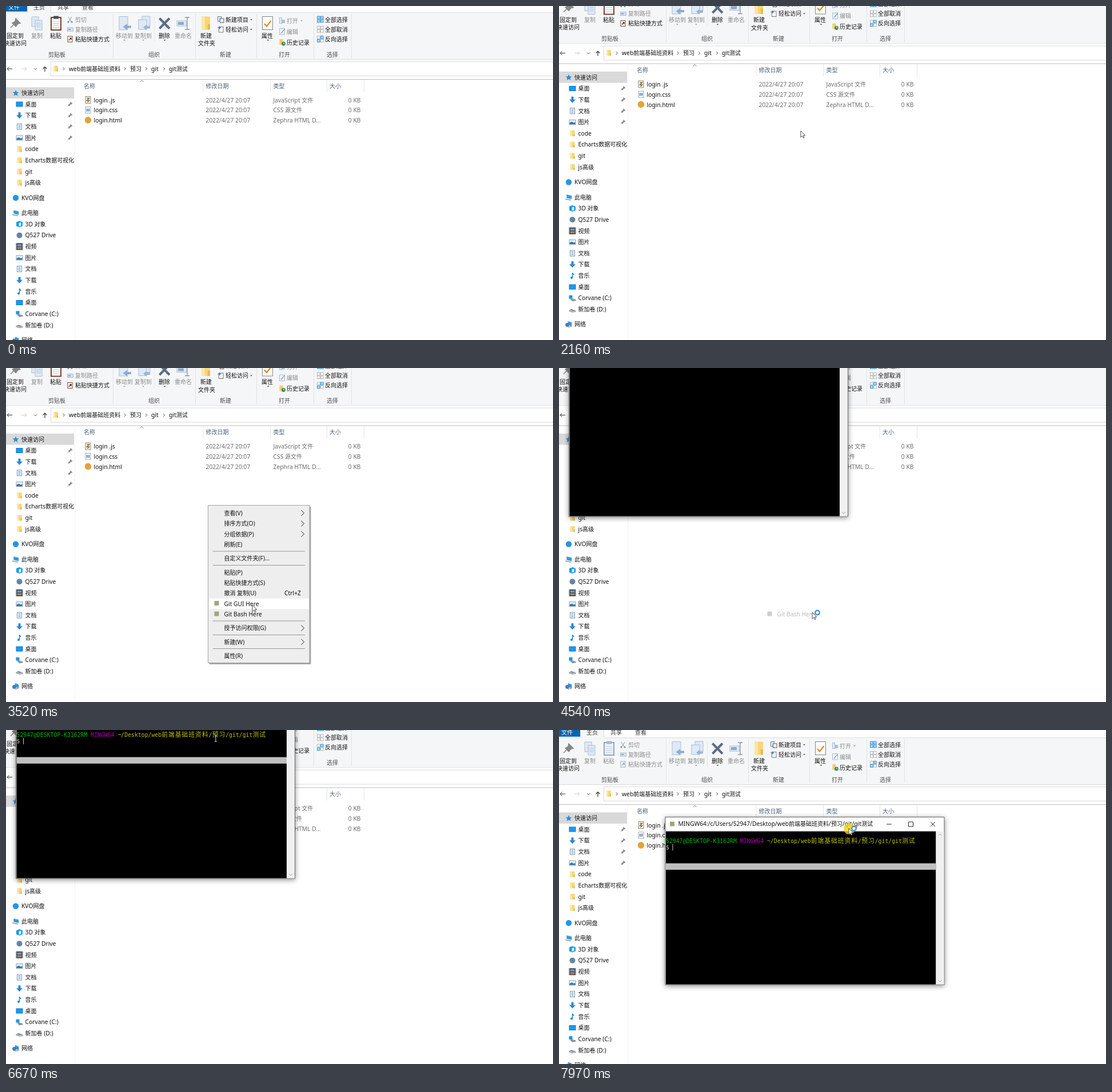
These frames come from a looping animation (957x585 px, 8000 ms). An HTML page:

```html
<!DOCTYPE html>
<html lang="zh-CN">
<head>
<meta charset="utf-8">
<title>Git Bash</title>
<style>
html, body { margin: 0; width: 100%; height: 100%; overflow: hidden; background: #fff; }
svg { display: block; width: 100%; height: 100%; }
text { font: 10px "Noto Sans", "Noto Sans CJK SC", "Noto Sans CJK JP", sans-serif; white-space: pre; }
.latin { font-size: 10.3px; }
.term text { font: 9.8px "DejaVu Sans Mono", "Noto Sans CJK SC", "Noto Sans CJK JP", monospace; }
.term .wide { font-size: 10.8px; letter-spacing: 1px; }
</style>
</head>
<body>
<svg id="stage" viewBox="0 0 957 585"></svg>
<script>
const LOOP = 8000;
const INK = '#111', DIM = '#8c8c8c', MUTED = '#6d6d6d', HEAD = '#4c607a';

const rect = (x, y, w, h, fill, stroke) =>
  `<rect x="${x}" y="${y}" width="${w}" height="${h}" fill="${fill}"${stroke ? ` stroke="${stroke}"` : ''}/>`;
const path = (d, stroke, w = 1, fill = 'none') =>
  `<path d="${d}" stroke="${stroke}" stroke-width="${w}" fill="${fill}"/>`;
const dot = (x, y, r, fill) => `<circle cx="${x}" cy="${y}" r="${r}" fill="${fill}"/>`;
const at = (x, y, body) => `<g transform="translate(${x} ${y})">${body}</g>`;
const group = (id, body, attrs = '') => `<g id="${id}" ${attrs}>${body}</g>`;
const text = (x, cy, s, fill = INK, anchor = 'start') =>
  `<text x="${x}" y="${cy + 3.7}" fill="${fill}" text-anchor="${anchor}">` +
  s.replace(/[ -~]+/g, m => `<tspan class="latin">${m}</tspan>`) + '</text>';
const drop = (x, y, fill = '#444') => path(`M${x - 2} ${y - 1}h4l-2 2z`, 'none', 0, fill);
const chevron = (x, y, s = 2.5, c = '#444') => path(`M${x - s / 2} ${y - s}l${s} ${s}l${-s} ${s}`, c);
const page = (x, y, w, h, fill = '#fff', stroke = '#9aa7b5') => rect(x, y, w, h, fill, stroke);

const icons = {
  star: path('M0-5.5L1.6-1.8L5.5-1.5L2.5 1.1L3.5 5L0 2.9L-3.5 5L-2.5 1.1L-5.5-1.5L-1.6-1.8Z', 'none', 0, '#2b8fd9'),
  desktop: rect(-6, -4.5, 12, 9, '#0a7bd6') + rect(-5, -3.5, 10, 7, '#1a98f0'),
  down: path('M-2-5.5h4v5h3.5L0 5.5L-5.5-.5H-2Z', 'none', 0, '#2f86d2'),
  doc: page(-4, -5, 8, 10, '#f2f7fb', '#7f97aa') + path('M-2-2.5h4M-2 0h4M-2 2.5h4', '#4b9bd0'),
  picture: rect(-5.5, -4, 11, 8, '#eaf4fb', '#8aa3b5') + path('M-5 3.5V1L-1-1L2 1L5 0V3.5Z', 'none', 0, '#3478a8'),
  folder: rect(-4, -5, 8, 10, '#f6d676') + rect(-4, -5, 3, 10, '#fbe7a5') + rect(2, 1, 2, 4, '#e2b74d'),
  disc: dot(0, 0, 5.2, '#2595e4'),
  steel: dot(0, 0, 5, '#6585a3'),
  pc: path('M-3.5-4.5L5-2.5V3L-3.5 1Z', '#7aa8c8', .8, '#2a9ae4') + path('M-6 3L4 5', '#8b9aa5', 1.5),
  cube: path('M-5.5-3.5L0-5.5L5.5-3.5V3.5L0 5.5L-5.5 3.5Z', 'none', 0, '#1a9ae5') +
    path('M-1-2L3-3V3L-1 4Z', 'none', 0, '#d9f1fc'),
  film: rect(-6, -6, 12, 12, '#3c4650') + rect(-3.5, -4, 7, 3.5, '#6ea0ce') + rect(-3.5, .8, 7, 3.5, '#b98258') +
    path('M-5-5V6M5-5V6', '#cfd6dc', 1).replace('/>', ' stroke-dasharray="1.3 1.3"/>'),
  note: path('M0 3.5V-5Q1-2.5 3-1.5', '#1087d8', 1.5) + dot(-1.5, 3.6, 2, '#1087d8'),
  drive: path('M-6 1.5L-2-.5L6 2V4.5L0 5.5L-6 3.5Z', 'none', 0, '#8b9298') + path('M-5 2L1 4L6 2.5', '#d9dde0'),
  sysdrive: path('M-4 2L-1 .5L6 2.5V4.5L0 5.5Z', 'none', 0, '#8b9298') + rect(-6, -5, 6, 6, '#1d96e2'),
  net: path('M-1-5L5-3V3L-1 1Z', '#5b93bf', .8, '#2a9ae4') + dot(-2.5, 1, 3.4, '#3f7fc0') + path('M-1 5L5 3.5', '#777', 1.2),
  js: page(-4.5, -6, 9, 12, '#f6f3e8', '#888') + path('M-2-3H2L-2 1H2L-1 4', '#8a6d28', 1.5),
  css: page(-4.5, -5.5, 9, 11, '#fff', '#9aa') + path('M-1.5-3L-2 3M2-3L1.5 3M-3-1H3M-3 1.2H3', '#3d70b2', .9),
  web: dot(0, 0, 5.8, '#e2a33a'),
  pin: path('M1-4L4-1L1 0L-1 3L-3 1L0-1ZM-2 2L-4 4', '#858c92', .8, '#858c92')
};
const icon = (name, x, y) => at(x, y, icons[name]);

function clipboard(on) {
  const [edge, clip] = on ? ['#7a3f2c', '#4b4b4b'] : ['#93a6c0', '#a9b7ca'];
  return rect(79, 20, 17, 22, on ? '#fff' : '#eaf0f8', edge).replace('/>', ' stroke-width="2"/>') +
    rect(83, 17.5, 9, 5, clip) +
    path('M82 27h11M82 30.5h11M82 34h11M82 37.5h11', on ? '#8fb3d6' : '#b9c8dc', .8) +
    text(77, 52, '粘贴', on ? INK : DIM) +
    rect(108, 53, 8, 10, '#fff', on ? '#7a3f2c' : '#93a6c0') +
    path('M110 60L114 56M111 56h3v3', on ? '#333' : '#8ea2bb', 1.2) +
    text(121, 58, '粘贴快捷方式', on ? INK : DIM);
}

function quad(y, fills) {
  return fills.map((f, i) => rect(544.5 + i % 2 * 6, y - 5.5 + (i >> 1) * 6, 4.7, 4.7, f, f === '#fff' ? '#b5b5b5' : '#3c9bd8')).join('');
}

function ribbon() {
  const pale = '#dfe9f5', edge = '#a9bdd6';
  let s = rect(0, -10, 957, 21, '#fff') + rect(0, 11, 957, 82.5, '#f5f6f7') + rect(0, -10, 37, 19.7, '#0a64ad') +
    path('M0 11.5H37.5V-10M78.5-10V11.5H957', '#dcddde') + rect(38, -10, 40, 23, '#f5f6f7') +
    text(4, 2, '文件', '#fff') + [[48, '主页'], [90, '共享'], [133, '查看']].map(([x, l]) => text(x, 2, l, '#333')).join('') +
    path('M0 93.5H957', '#d8d9da') + path('M187.5 14V91M331.5 14V91M438.5 14V91M538.5 14V91M604.5 14V91', '#e1e2e3') +
    path('M259.5 17V62', '#e6e7e8') +
    [[74, '剪贴板'], [249, '组织'], [374, '新建'], [477, '打开'], [561, '选择']].map(([x, l]) => text(x, 85, l, '#4d4d4d')).join('');
  // clipboard group
  s += path('M17 22L25 30L21 31L17 36L11 30L16 27ZM13 33L8 38', '#868686', 1.5, '#868686') + text(1, 52, '固定到') + text(-4, 65, '快速访问') +
    page(45, 19, 12, 17, pale, edge) + page(51, 25, 12, 17, pale, edge) + path('M53 30h8M53 33h8M53 36h8', edge, .8) + text(44, 52, '复制', DIM) +
    path('M109 19L114 27M115 19L110 27', '#8b9aab') + dot(109, 28, 1.7, '#8b9aab') + dot(115, 28, 1.7, '#8b9aab') + text(121, 24, '剪切', DIM) +
    rect(107.5, 38, 10, 6, '#d6e2f0', edge) + path('M109 42l1-2l1 2l1-2l1 2', '#6f86a4', .8) + text(121, 41, '复制路径', DIM) +
    group('pasteOn', clipboard(true)) + group('pasteOff', clipboard(false));
  // organise group
  s += page(198, 18.5, 15, 23, pale, edge) + path('M219 34.5H212V31L204.5 36.5L212 42V38.5H219Z', 'none', 0, '#8fabcc') + text(192, 52, '移动到', DIM) + drop(207, 60, '#999') +
    page(238, 18, 14, 17, pale, edge) + page(232, 24, 14, 17, pale, edge) + path('M252 35.5h-6v-3l-6 5l6 5v-3h6z', 'none', 0, '#9bb5d3') + text(225, 52, '复制到', DIM) + drop(240, 60, '#999') +
    path('M268.5 21.5L286 39.5M286 21.5L268.5 39.5', '#5b6c84', 4) + text(267, 52, '删除') + drop(277.5, 60) +
    rect(299, 26, 17, 9, pale, edge) + rect(301, 28, 10, 5, '#8ea8c8') + path('M313 20h8M313 41h8M317 20V41', '#8494a8', 1.3) + text(295, 52, '重命名', DIM);
  // new group
  s += rect(342, 18.5, 15, 23, '#f6d676') + rect(342, 18.5, 6, 23, '#fbe6a3') + rect(353, 32, 4, 9.5, '#e3bb58') + text(340, 52, '新建') + text(336, 65.5, '文件夹') +
    page(370.5, 18.5, 6, 8, '#dcebf7', '#5d89ad') + page(374.5, 22, 6.5, 7, '#fff', '#555') + text(384, 24, '新建项目') + drop(429, 24) +
    page(372.5, 36.5, 7.5, 9.5, '#fff', '#777') + path('M370 38h5l-2-2M375 38l-2 2', '#2f7fbe', 1.2) + text(384, 41, '轻松访问') + drop(429, 41);
  // open group
  s += page(448.5, 18.5, 18, 23, '#fff', '#858585') + path('M452 31L456 35.5L463.5 26', '#e08a2c', 2.4) + text(447, 52, '属性') + drop(458.5, 60) +
    page(478.5, 20.5, 4, 10, pale, edge) + rect(483, 24, 5, 6, '#a8c0da') + text(491, 26, '打开', DIM) + drop(517, 26, '#999') +
    page(478.5, 39.5, 9, 10.5, '#eef3f9', edge) + path('M481 48L488 40', '#8ba3bf', 1.5) + text(491, 45, '编辑', DIM) +
    rect(478.5, 58, 6, 10, '#f2cf6a') + dot(485.5, 66, 3.4, '#3e8a54') + path('M485.5 64v2h2', '#fff', .8) + text(491, 64, '历史记录');
  // select group
  const on = '#a6d6f5', off = '#fff';
  return s + quad(23.5, [on, on, on, on]) + quad(41, [off, off, off, off]) + quad(58, [off, on, on, off]) +
    text(558, 24, '全部选择') + text(558, 41, '全部取消') + text(558, 58, '反向选择');
}

function addressBar() {
  return rect(0, 94, 957, 34, '#fff') + rect(78.5, 97.5, 900, 25, '#fff', '#d9d9d9') + path('M0 128.5H957', '#bdbdbd') +
    path('M11 110H2M5.5 106.5L2 110L5.5 113.5', '#333') + path('M27 110H36M32.5 106.5L36 110L32.5 113.5', '#ccc') +
    path('M49 109L51.5 111.5L54 109', '#555') + path('M68 115V107M64.5 110L68 106.5L71.5 110', '#333', 1.2) +
    icon('folder', 87, 109.5) + [101, 208, 245.5, 276.5].map(x => chevron(x, 110)).join('') +
    [[110, 'web前端基础班资料'], [217, '预习'], [254, 'git'], [285, 'git测试']].map(([x, l]) => text(x, 110, l)).join('');
}

function sidebar() {
  const rows = [
    ['desktop', '桌面'], ['down', '下载'], ['doc', '文档'], ['picture', '图片'], ['folder', 'code'],
    ['folder', 'Echarts数据可视化项目'], ['folder', 'git'], ['folder', 'js高级']];
  const pcRows = [
    ['cube', '3D 对象'], ['steel', 'Q527 Drive'], ['film', '视频'], ['picture', '图片'], ['doc', '文档'],
    ['down', '下载'], ['note', '音乐'], ['desktop', '桌面'], ['sysdrive', 'Corvane (C:)'], ['drive', '新加卷 (D:)']];
  const list = (items, y) => items.map(([ic, l], i) => icon(ic, 23.5, y + i * 19.65) + text(33.5, y + i * 19.65, l)).join('');
  const root = (ic, l, y) => icon(ic, 17, y) + text(27, y, l);
  return rect(0, 142.3, 119, 19.7, '#d9d9d9') + path('M120.5 129V640', '#f3f3f3') +
    root('star', '快速访问', 152.5) + list(rows, 172) + [0, 1, 2, 3].map(i => icon('pin', 112, 172 + i * 19.65)).join('') +
    root('disc', 'KVO网盘', 336) + root('pc', '此电脑', 362.5) + list(pcRows, 382) + root('net', '网络', 585);
}

function files() {
  const rows = [['js', 'login .js', 'JavaScript 文件'], ['css', 'login.css', 'CSS 源文件'], ['web', 'login.html', 'Zephra HTML D...']];
  return path('M345 129V151M462.5 129V151M561.5 129V151M626.5 129V151', '#e4e4e4') + path('M234.5 133L237.5 130L240.5 133', '#777') +
    [[136, '名称'], [349.5, '修改日期'], [467.5, '类型'], [566, '大小']].map(([x, l]) => text(x, 140, l, HEAD)).join('') +
    rows.map(([ic, name, kind], i) => {
      const y = 165 + i * 17.7;
      return icon(ic, 143.5, y - .5) + text(153.5, y, name) + text(349.5, y, '2022/4/27 20:07', MUTED) +
        text(467.5, y, kind, MUTED) + text(620.5, y, '0 KB', MUTED, 'end');
    }).join('');
}

const GIT = '#9da878';
const menuItems = [
  [254, '查看(V)', 1], [272.4, '排序方式(O)', 1], [290.8, '分组依据(P)', 1], [309.2, '刷新(E)'], [333.5, '自定义文件夹(F)...'],
  [357.8, '粘贴(P)'], [376.2, '粘贴快捷方式(S)'], [394.6, '撤消 复制(U)'], [413, 'Git GUI Here'], [431.3, 'Git Bash Here'],
  [455.5, '授予访问权限(G)', 1], [479.8, '新建(W)', 1], [504.2, '属性(R)']];

function menu() {
  return rect(355.5, 243, 178, 276, '#777').replace('/>', ' opacity=".65"/>') + rect(353.5, 240.5, 177.5, 276, '#eeeeee', '#a3a3a3') +
    group('menuHover', rect(355, -9.2, 175, 18.4, '#fff')) +
    [321, 345.5, 443, 467.5, 491.5].map(y => path(`M362 ${y}H523`, '#969696')).join('') +
    menuItems.map(([y, l, sub]) => text(381.5, y, l) + (sub ? chevron(519, y, 5, '#222') : '')).join('') +
    text(516, 394.6, 'Ctrl+Z', INK, 'end') + rect(364.5, 408, 8, 8, GIT) + rect(364.5, 426.5, 8, 8, GIT);
}

function terminal() {
  const run = (s, fill) => `<tspan fill="${fill}">` + s.replace(/[^ -~]+/g, m => `<tspan class="wide">${m}</tspan>`) + '</tspan>';
  const dir = 'web前端基础班资料/预习/git/git测试';
  return rect(0, 0, 488, 293.5, '#fff', '#666').replace('/>', ' style="filter:drop-shadow(0 2px 5px rgba(0,0,0,.45))"/>') +
    rect(1, 25, 472.5, 268, '#000') + rect(473.5, 25, 14, 268, '#f0f0f0') +
    path('M477.5 32.5L480.5 29.5L483.5 32.5M477.5 285.5L480.5 288.5L483.5 285.5', '#a5a5a5') +
    rect(8, 8, 8, 8, GIT) + text(22.5, 12.2, 'MINGW64:/c/Users/52947/Desktop/' + dir) +
    path('M387 12.5h9M425.5 8.5h8v8h-8zM464 8.5l8 8M472 8.5l-8 8', '#222') +
    group('prompt', `<text x="1" y="45">${run('52947@DESKTOP-K3162RM ', '#00b800')}${run('MINGW64 ', '#b400b4')}${run('~/Desktop/' + dir, '#bfbf00')}</text>` +
      `<text x="1" y="56.4" fill="#bfbfbf">$</text>` + rect(12.5, 47.5, 1, 11, '#d0d0d0') + rect(1, 81, 472.5, 11.3, '#bfbfbf'), 'class="term"');
}

const stage = document.getElementById('stage');
stage.innerHTML = '<clipPath id="pane"><rect x="0" y="129" width="119" height="520"/></clipPath>' +
  rect(0, 0, 957, 585, '#fff') +
  group('explorer', ribbon() + addressBar() + group('rowHover', rect(134, 156, 490, 17.7, '#e5f3ff')) + files() +
    `<g clip-path="url(#pane)">${sidebar()}</g>` + path('M120.5 129V640', '#f3f3f3')) +
  group('menu', menu()) + group('ghost', text(381.5, 431.3, 'Git Bash Here', '#555') + rect(364.5, 426.5, 8, 8, '#888')) +
  group('win', terminal()) +
  group('mouse', group('glow', dot(1, 1, 10, '#f2d41c'), 'opacity=".8"') +
    group('arrow', path('M0 0V11.2L2.6 8.8L4.5 12.6L6.2 11.8L4.4 8.1H7.8Z', '#222', .8, '#fff')) +
    group('ring', `<circle cx="9" cy="0.5" r="3.8" fill="#fff" stroke="#3b8cc4" stroke-width="2.2"/>`) +
    group('beam', path('M-2-5h4M0-5V5M-2 5h4', '#ddd')));

const el = {};
stage.querySelectorAll('[id]').forEach(n => el[n.id] = n);
const show = (id, on) => el[id].style.display = on ? '' : 'none';
const move = (id, x, y) => el[id].setAttribute('transform', `translate(${x} ${y})`);

// Keys are [time, x, y]
const mousePath = [
  [260, 925, 583], [500, 725, 435], [750, 520, 305], [1010, 433, 259], [1230, 429, 236], [2159, 429, 236],
  [2160, 423, 219], [2450, 395, 140], [2780, 353, 241], [2990, 353, 241], [3250, 392, 330], [3520, 431, 415],
  [3730, 436, 422.5], [3860, 437, 423], [3930, 443, 428], [4700, 443, 428], [5090, 425, 165], [5500, 400, 110],
  [5910, 385, 40], [6670, 367, 15], [7000, 355, 10], [7450, 336, 17], [7620, 340, 24], [7970, 507, 172]];
const dragPath = [[7450, 17.5, -6], [7620, 22, 1], [7970, 186, 150.5]];
const scrollPath = [[0, 0, 0], [69.9, 0, 0], [70, 0, -27.5], [6700, 0, -27.5], [7000, 0, 2]];

function follow(keys, t) {
  if (t <= keys[0][0]) return keys[0].slice(1);
  const i = keys.findIndex(k => k[0] > t);
  if (i < 0) return keys[keys.length - 1].slice(1);
  const [a, b] = [keys[i - 1], keys[i]], u = (t - a[0]) / (b[0] - a[0]);
  return [a[1] + (b[1] - a[1]) * u, a[2] + (b[2] - a[2]) * u];
}

function draw(t) {
  const scroll = follow(scrollPath, t)[1];
  const [mx, my] = follow(mousePath, t);
  const [wx, wy] = follow(dragPath, t);
  const open = t >= 4470, menuOpen = t >= 2850 && t < 4330;
  move('explorer', 0, scroll);
  show('pasteOn', t < 4330);
  show('pasteOff', t >= 4330);

  const row = Math.floor((my - scroll - 156) / 17.7);
  show('rowHover', t >= 2160 && t < 2850 && row >= 0 && row < 3);
  move('rowHover', 0, row * 17.7);

  show('menu', menuOpen);
  const item = menuItems.find(([y]) => Math.abs(my - y) <= 9.2);
  show('menuHover', t >= 2990 && item);
  if (item) move('menuHover', 0, item[0]);
  show('ghost', t >= 4330 && t < 4680);
  el.ghost.setAttribute('opacity', Math.max(0, 1 - (t - 4330) / 350));

  show('win', open);
  move('win', wx, wy + scroll);
  show('prompt', t >= 5550);

  const titleEnd = wy + scroll + 25;
  const typing = open && my > titleEnd && my < titleEnd + 268;
  show('mouse', t >= 260);
  move('mouse', mx, my);
  show('arrow', !typing);
  show('ring', t >= 4400 && !typing);
  show('beam', typing);
  show('glow', t >= 7480);
}

function tick() {
  draw(performance.now() % LOOP);
  requestAnimationFrame(tick);
}
tick();
</script>
</body>
</html>
```
